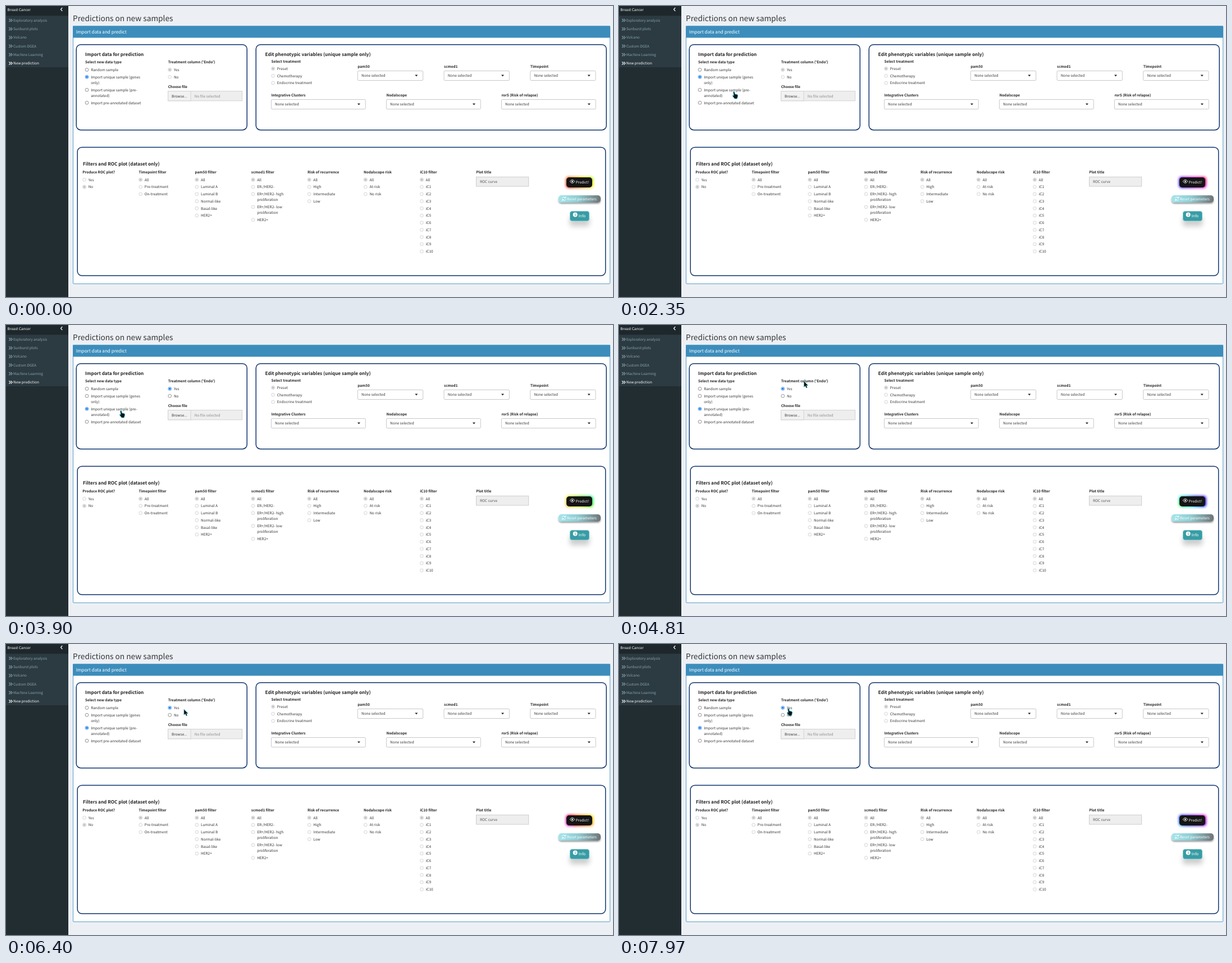
An HTML page that plays this animation: 1081x518 px, repeating every 8000 ms.

```html
<!DOCTYPE html>
<html lang="en">
<head>
<meta charset="utf-8">
<title>Predictions on new samples</title>
<style>
html, body { margin: 0; width: 100%; height: 100%; overflow: hidden; background: #ecf0f5; }
body { position: relative; }
svg { position: absolute; left: 0; top: 0; }
text, .btn {
  font-family: "Noto Sans CJK JP", "Noto Sans CJK SC", "Noto Sans CJK KR", "Noto Sans CJK TC", "Noto Sans CJK", Lato, sans-serif;
  text-rendering: geometricPrecision;
}
.btn { position: absolute; box-sizing: border-box; }
#glow {
  position: absolute; left: 996.5px; top: 303.5px; width: 49px; height: 20.5px; border-radius: 5px;
  background: linear-gradient(45deg, #ff0000, #ff7300, #fffb00, #48ff00, #00ffd5, #002bff, #7a00ff, #ff00c8, #ff0000);
  background-size: 400%; filter: blur(2px);
}
#predict { left: 998px; top: 305px; width: 46px; height: 17.5px; border-radius: 5px; background: #151515; }
#reset {
  left: 984px; top: 337px; width: 74.5px; height: 12.5px; border-radius: 5px;
  background: linear-gradient(100deg, #a3e6ec, #90cdd3 45%, #6d7275);
  box-shadow: 0 2px 3px rgba(0,0,0,.4);
}
#info {
  left: 1004px; top: 365px; width: 34.5px; height: 17.5px; border-radius: 4px;
  background: #389ca5; border: 1px solid #6fc3ca; box-shadow: 0 9px 10px rgba(0,0,0,.2);
}
</style>
</head>
<body>
<svg id="page" width="1081" height="518"></svg>
<div id="glow"></div>
<div class="btn" id="predict"></div>
<div class="btn" id="reset"></div>
<div class="btn" id="info"></div>
<svg id="top" width="1081" height="518"></svg>
<script>
const $ = id => document.getElementById(id);
const BODY = 6.45, LABEL = 6.35, HEAD = 8.15;

// y is the middle of the capitals
const text = (x, y, s, size = BODY, fill = '#333', weight = 400) =>
  `<text x="${x}" y="${y + size * .37}" font-size="${size}" fill="${fill}" font-weight="${weight}">${s}</text>`;
const label = (x, y, s) => text(x, y, s, LABEL, '#222', 700);
const heading = (x, y, s) => text(x, y, s, HEAD, '#222', 700);
const rect = (x, y, x2, y2, fill, stroke = 'none', r = 0, w = 1) =>
  `<rect x="${x}" y="${y}" width="${x2 - x}" height="${y2 - y}" rx="${r}" fill="${fill}" stroke="${stroke}" stroke-width="${w}"/>`;
const path = (d, stroke, w = 1, fill = 'none') =>
  `<path d="${d}" fill="${fill}" stroke="${stroke}" stroke-width="${w}" stroke-linejoin="round"/>`;
const panel = (x, y, x2, y2) => rect(x, y, x2, y2, '#fff', '#0d336f', 8, 1.5);

function radio(x, y, on, off) {
  const c = off ? (on ? '#bcbcbc' : '#cfcfcf') : on ? '#1177e8' : '#777';
  return `<circle cx="${x}" cy="${y}" r="2.9" fill="${off ? '#fafafa' : '#fff'}" stroke="${c}" stroke-width=".8"/>` +
    (on ? `<circle cx="${x}" cy="${y}" r="1.75" fill="${c}"/>` : '');
}

// Each option may wrap with "|"; pick < 0 leaves the circles out
function options(x, y, list, pick = 0, off = true) {
  let out = '';
  list.forEach((item, i) => {
    if (pick >= 0) out += radio(x, y, i === pick, off);
    item.split('|').forEach((line, k) => {
      if (k) y += 10.2;
      out += text(x + 7.2, y, line);
    });
    y += 12.75;
  });
  return out;
}

const select = (x, y, w, name) =>
  label(x, y - 16.5, name) + rect(x, y - 8.5, x + w, y + 8.5, '#fff', '#c8c8c8', 1.5) +
  text(x + 6.7, y, 'None selected') +
  `<path d="M${x + w - 14.3} ${y - 1.6}h5l-2.5 3z" fill="#222"/>`;

function sidebar() {
  let out = rect(0, 0, 111, 518, '#222d32') + rect(0, 0, 111, 17.5, '#1e282c') +
    rect(0, 17.5, 111, 109, '#2c3b41') + text(2.5, 6.5, 'Breast Cancer', BODY, '#fff') +
    path('M100.3 3l-2.8 3 2.8 3', '#fff', 1.1);
  ['Exploratory analysis', 'Sunburst plots', 'Volcano', 'Custom DGEA', 'Machine Learning', 'New prediction']
    .forEach((name, i) => {
      const y = 25.5 + i * 15.3, c = i === 5 ? '#fff' : '#8aa4af';
      out += path(`M5.3 ${y - 2.7}l2.7 2.7-2.7 2.7m3.2-5.4l2.7 2.7-2.7 2.7`, c, 1.1) + text(13, y, name, BODY, c);
    });
  return out;
}

const dataTypes = ['Random sample', 'Import unique sample (genes|only)',
  'Import unique sample (pre-|annotated)', 'Import pre-annotated dataset'];

const importPanel = () => panel(125.2, 68.7, 429.2, 220.7) +
  heading(141, 85.5, 'Import data for prediction') +
  label(141, 100, 'Select new data type') + options(144, 113.5, dataTypes, -1) +
  label(288.7, 100, "Treatment column ('Endo')") + options(291.7, 113.5, ['Yes', 'No'], -1) +
  label(288.7, 144, 'Choose file') +
  rect(288.5, 151.5, 420.5, 168.8, '#eee', '#d2d2d2') + rect(288.5, 151.5, 329, 168.8, '#f1f1f1', '#d2d2d2') +
  text(295, 160.3, 'Browse...') + text(335.8, 160.3, 'No file selected', BODY, '#888');

const importRadios = done =>
  [113.5, 126.3, 149.3, 172.2].map((y, i) => radio(144, y, i === (done ? 2 : 1), false)).join('') +
  radio(291.7, 113.5, true, !done) + radio(291.7, 126.3, false, !done);

const editPanel = () => panel(445.2, 68.7, 1069.2, 220.7) +
  heading(461.5, 85.5, 'Edit phenotypic variables (unique sample only)') +
  label(472.5, 98.5, 'Select treatment') +
  options(475.6, 111.5, ['Preset', 'Chemotherapy', 'Endocrine treatment']) +
  ['pam50', 'scmod1', 'Timepoint'].map((n, i) => select(626.3 + i * 153.7, 124, 116.3, n)).join('') +
  ['Integrative Clusters', 'Nodalscope', 'rorS (Risk of relapse)']
    .map((n, i) => select(472.4 + i * 205, 175, 167.8, n)).join('');

const filters = [
  ['Produce ROC plot?', ['Yes', 'No'], 1],
  ['Timepoint filter', ['All', 'Pre-treatment', 'On-treatment']],
  ['pam50 filter', ['All', 'Luminal A', 'Luminal B', 'Normal-like', 'Basal-like', 'HER2+']],
  ['scmod1 filter', ['All', 'ER-/HER2-', 'ER+/HER2- high|proliferation', 'ER+/HER2- low|proliferation', 'HER2+']],
  ['Risk of recurrence', ['All', 'High', 'Intermediate', 'Low']],
  ['Nodalscope risk', ['All', 'At risk', 'No risk']],
  ['iC10 filter', ['All', ...Array.from({ length: 10 }, (_, i) => 'iC' + (i + 1))]]
];

const filterPanel = () => panel(127.2, 251.5, 1067.7, 480) +
  heading(137, 280.7, 'Filters and ROC plot (dataset only)') +
  filters.map(([name, list, pick], i) => {
    const x = 136.3 + i * 100.15;
    return label(x, 296, name) + options(x + 3.2, 309.2, list, pick);
  }).join('') +
  label(837.3, 296, 'Plot title') + rect(837.5, 304.3, 930.7, 321, '#eee', '#ccc') +
  text(844, 312.7, 'ROC curve', BODY, '#555');

$('page').innerHTML = sidebar() + text(119, 22, 'Predictions on new samples', 13.7) +
  rect(119.5, 36, 1075.7, 494.5, '#fff', '#5a9fc6', 1.5) + rect(119, 35.5, 1076, 56.5, '#3c8dbc') +
  text(124.7, 46, 'Import data and predict', 8.15, '#fff') + importPanel() + editPanel() + filterPanel() +
  `<g id="before">${importRadios(false)}</g><g id="after">${importRadios(true)}</g>`;

const icons =
  path('M1004.3 312.3q4.2-6 8.4 0q-4.2 6-8.4 0z', '#fff', .9) + '<circle cx="1008.5" cy="312.3" r="1.4" fill="#fff"/>' +
  path('M990.3 342.2q1.5-3.4 5.6-1.2m1-2v2.9h-2.9M997.2 344q-1.5 3.4-5.6 1.2m-1 2v-2.9h2.9', '#fff', 1) +
  '<circle cx="1013.7" cy="371.4" r="4" fill="#fff"/>' + path('M1013.7 369v.9m0 .8v3', '#389ca5', 1.1);

const arrow = path('M0 0V9.6L2.3 7.6 4 11.3 5.6 10.6 4 7H7z', '#1d8c95', .6, '#0a1214');
const hand = path('M1.2 .6Q2.3-.6 3.2 .8L3.9 4.3 7.6 5.1Q9.2 5.6 9 7.2L8.4 10.2 7.6 12.4H3.6L.4 8.4Q-.6 6.8 .8 6.6L2 7.4z',
  '#19a9b5', .8, '#0a1214');

$('top').innerHTML = text(1014.7, 313.9, 'Predict!', BODY, '#fff') + text(999, 343.3, 'Reset parameters', 6.5, '#fff', 500) +
  text(1019.8, 373.7, 'Info', 6.8, '#fff', 500) + icons +
  `<g id="cursor"><g id="arrow">${arrow}</g><g id="hand">${hand}</g></g>`;

// Pointer tip: time, x, y
const route = [
  [380, 962, 491], [820, 781, 436], [1230, 563, 335], [1650, 312, 190], [1820, 238, 163], [2050, 202.5, 152.5],
  [4290, 202.5, 152.5], [4720, 329.5, 100.5], [5860, 330, 102], [6250, 317, 116.5], [6450, 317, 116.5],
  [6660, 298, 115], [6900, 299.5, 115]
];

function tip(t) {
  const i = route.findIndex(k => k[0] > t);
  if (i < 0) return route[route.length - 1].slice(1);
  if (!i) return route[0].slice(1);
  const [t0, x0, y0] = route[i - 1], [t1, x1, y1] = route[i], p = (t - t0) / (t1 - t0);
  return [x0 + (x1 - x0) * p, y0 + (y1 - y0) * p];
}

const show = (id, on) => $(id).style.display = on ? '' : 'none';

function draw(now) {
  const t = now % 8000;
  const [x, y] = tip(t);
  const pointing = t > 1170 && t < 1290 || t > 1900 && t < 4340 || t > 6600;
  show('cursor', t >= 380);
  $('cursor').setAttribute('transform', `translate(${x} ${y})`);
  show('hand', pointing);
  show('arrow', !pointing);
  show('before', t < 2800);
  show('after', t >= 2800);
  // The rainbow slides at a steady rate and turns back at 6650 ms
  $('glow').style.backgroundPosition = (16 - 2.4 * Math.abs(t - 6650) / 1000) / 6 * 100 + '% 0';
  requestAnimationFrame(draw);
}
requestAnimationFrame(draw);
</script>
</body>
</html>
```
